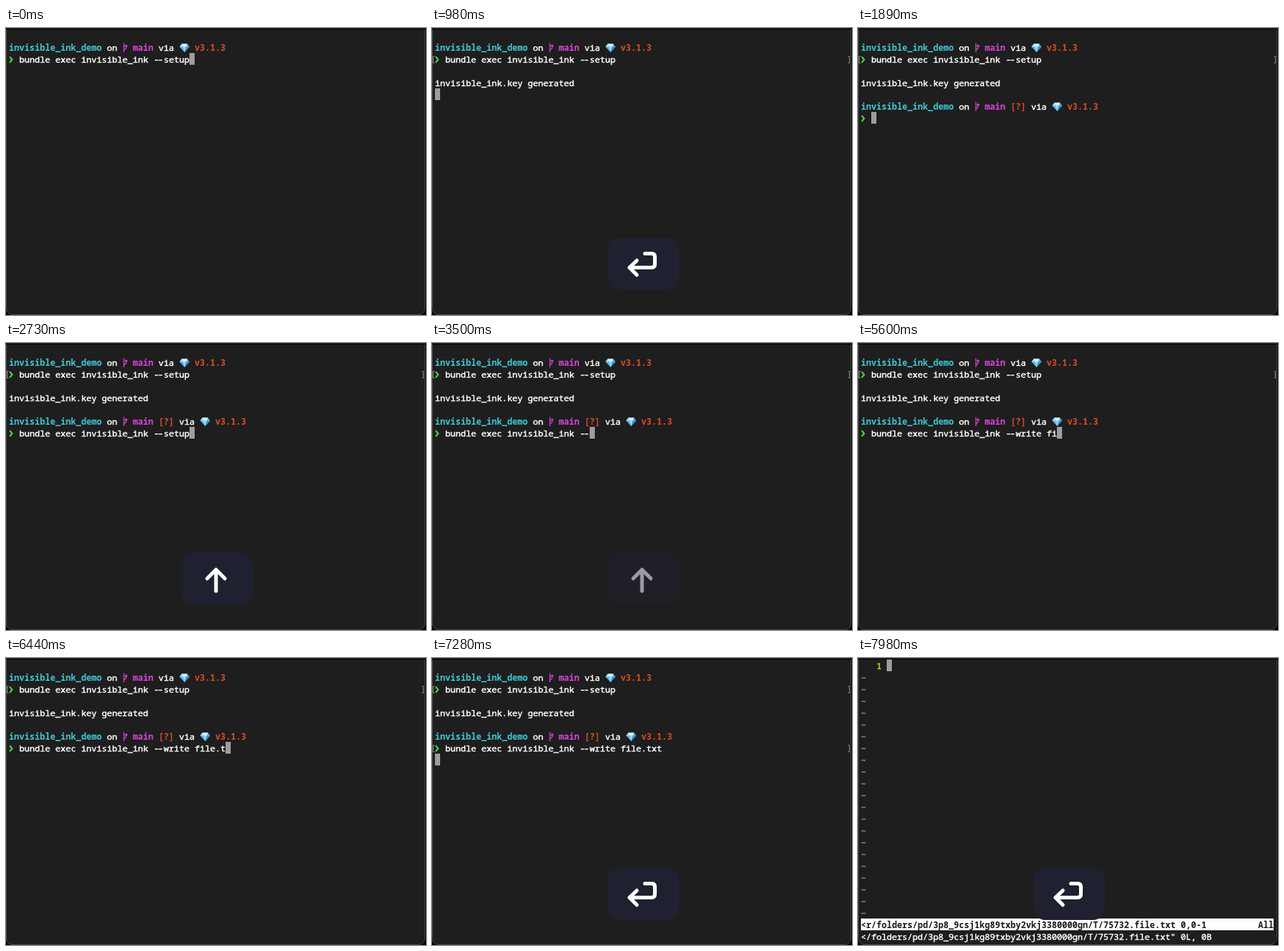
An HTML page with a canvas that plays this animation: 570x390 px, repeating every 8 s.

```html
<!DOCTYPE html>
<html lang="en">
<head>
<meta charset="utf-8">
<title>Terminal session</title>
<style>
  html, body { margin: 0; width: 100%; height: 100%; overflow: hidden; background: #000; }
  canvas { display: block; }
</style>
</head>
<body>
<canvas id="stage" width="570" height="390"></canvas>
<script>
const ctx = document.getElementById('stage').getContext('2d');
const LOOP = 8000, CELL = 7, ROW = 16, LEFT = 4, TOP = 2;
const FONT = '11.67px "Noto Sans Mono", "DejaVu Sans Mono", monospace';
const C = {
  bg: '#1e1e1e', text: '#fff', cursor: '#9d9d9d', cyan: '#41c9d6', pink: '#dc45dc',
  red: '#de4b26', green: '#45d63c', yellow: '#d9d92b', tilde: '#8585cf', key: '#1f2130'
};
const T = { enter1: 280, output: 980, prompt: 1190, up: 2450, enter2: 7210, vim: 7910 };
const BASE = 'bundle exec invisible_ink --';
const ERASE = [3290, 3340, 3390, 3440, 3490];
const TYPED = 'write file.txt';
const TYPE_AT = [4130, 4340, 4480, 4610, 4760, 4900, 5460, 5600, 5810, 6020, 6230, 6440, 6650, 6860];
const TMP = '/folders/pd/3p8_9csj1kg89txby2vkj3380000gn/T/75732.file.txt';

const colX = col => LEFT + col * CELL;
const rowY = row => TOP + row * ROW;
const passed = (times, t) => times.filter(at => t >= at).length;

// Regular text gets a hairline outline for a medium weight.
function write(str, col, row, color = C.text, weight = 400) {
  ctx.font = weight + ' ' + FONT;
  ctx.fillStyle = ctx.strokeStyle = color;
  ctx.lineWidth = 0.45;
  ctx.lineJoin = 'round';
  for (let i = 0; i < str.length; i++) {
    const x = colX(col + i), y = rowY(row);
    if (str.startsWith('--', i)) {
      ctx.fillRect(x + 2, y + 9, 4.6, 1.4);
      ctx.fillRect(x + 7.4, y + 9, 4.6, 1.4);
      i++;
    } else if (str[i] !== ' ') {
      ctx.fillText(str[i], x, y + 13);
      if (weight === 400) ctx.strokeText(str[i], x, y + 13);
    }
  }
}

function poly(points, color) {
  ctx.beginPath();
  points.forEach(([x, y]) => ctx.lineTo(x, y));
  ctx.closePath();
  ctx.fillStyle = color;
  ctx.fill();
}

function line(path, color, width, cap = 'butt') {
  ctx.strokeStyle = color;
  ctx.lineWidth = width;
  ctx.lineCap = cap;
  ctx.lineJoin = cap === 'round' ? 'round' : 'miter';
  ctx.stroke(new Path2D(path));
}

function at(x, y, draw) {
  ctx.save();
  ctx.translate(x, y);
  draw();
  ctx.restore();
}

function gem() {
  poly([[3.5, 3.5], [11, 3.5], [14, 7.5], [7.3, 15], [0.5, 7.5]], '#58b4e6');
  poly([[3.5, 3.5], [5, 7.5], [0.5, 7.5]], '#a9dff6');
  poly([[3.5, 3.5], [11, 3.5], [9.7, 7.5], [5, 7.5]], '#d8f3fc');
  poly([[5, 7.5], [9.7, 7.5], [7.3, 15]], '#98d8f5');
  poly([[9.7, 7.5], [14, 7.5], [7.3, 15]], '#3a8fcb');
}

function branch() {
  line('M2 2.5V15M2 12L5 9.5V5.5M3.2 7.2L5 5.2L6.8 7.2', C.pink, 1.2);
}

function cursor(col, row) {
  ctx.fillStyle = C.cursor;
  ctx.fillRect(colX(col), rowY(row), CELL, ROW);
}

function prompt(row, dirty) {
  const shift = dirty ? 4 : 0;
  write('invisible_ink_demo', 0, row, C.cyan, 700);
  write('on', 19, row);
  at(colX(22), rowY(row), branch);
  write('main', 24, row, C.pink, 700);
  if (dirty) write('[?]', 29, row, C.red, 700);
  write('via', 29 + shift, row);
  at(colX(33 + shift), rowY(row), gem);
  write('v3.1.3', 36 + shift, row, C.red, 700);
  at(LEFT, rowY(row + 1), () => line('M1 5L4.4 9L1 13', C.green, 2));
}

function marks(row) {
  at(0, rowY(row), () => line('M3.5 4.5H1.5V13.5H3.5M564.5 4.5H566.5V13.5H564.5', '#8c8c8c', 1));
}

function command(t) {
  if (t < T.up) return '';
  if (t < TYPE_AT[0]) return BASE + 'setup'.slice(0, 5 - passed(ERASE, t));
  return BASE + TYPED.slice(0, passed(TYPE_AT, t));
}

function shell(t) {
  const first = BASE + 'setup';
  prompt(1, false);
  write(first, 2, 2);
  if (t < T.enter1) return cursor(2 + first.length, 2);
  marks(2);
  if (t < T.output) return cursor(0, 3);
  write('invisible_ink.key generated', 0, 4);
  if (t < T.prompt) return cursor(0, 5);
  prompt(6, true);
  const cmd = command(t);
  write(cmd, 2, 7);
  if (t < T.enter2) return cursor(2 + cmd.length, 7);
  marks(7);
  cursor(0, 8);
}

function editor() {
  write('1', 3, 0, C.yellow);
  cursor(5, 0);
  for (let row = 1; row < 22; row++) write('~', 0, row, C.tilde);
  ctx.fillStyle = '#fff';
  ctx.fillRect(LEFT, rowY(22), 80 * CELL, ROW);
  write('<r' + TMP + ' 0,0-1', 0, 22, '#1a1a1a', 700);
  write('All', 77, 22, '#1a1a1a', 700);
  write('<' + TMP + '" 0L, 0B', 0, 23);
}

// Key badge: holds, then fades out linearly.
function keyBadge(t, start, icon) {
  const age = t - start;
  if (age < 0 || age > 1400) return;
  ctx.globalAlpha = Math.min(1, (1400 - age) / 630);
  ctx.fillStyle = C.key;
  ctx.beginPath();
  ctx.roundRect(238, 285, 97, 71, 16);
  ctx.fill();
  line(icon, '#fff', 5, 'round');
  ctx.globalAlpha = 1;
}

const RETURN = 'M289 306.5H298Q302.5 306.5 302.5 311V321Q302.5 325.5 298 325.5H268M278 316L268 325.5L278 335.5';
const UP = 'M285 308V337M273 320L285 308L297 320';

function frame() {
  ctx.fillStyle = '#000';
  ctx.fillRect(0, 0, 570, 390);
  ctx.fillStyle = '#2c2c2c';
  ctx.fillRect(0, 0, 570, 1);
  ctx.fillStyle = C.bg;
  ctx.beginPath();
  ctx.roundRect(0, 2, 569, 388, [0, 0, 9, 9]);
  ctx.fill();
  line('M0.5 2V380.5Q0.5 389.5 9.5 389.5H559.5Q568.5 389.5 568.5 380.5V2', '#464646', 1);
}

function draw(t) {
  frame();
  if (t < T.vim) shell(t);
  else editor();

  keyBadge(t, T.enter1, RETURN);
  keyBadge(t, T.up, UP);
  keyBadge(t, T.enter2, RETURN);
}

const began = performance.now();
function tick() {
  draw((performance.now() - began) % LOOP);
  requestAnimationFrame(tick);
}
tick();
</script>
</body>
</html>
```
